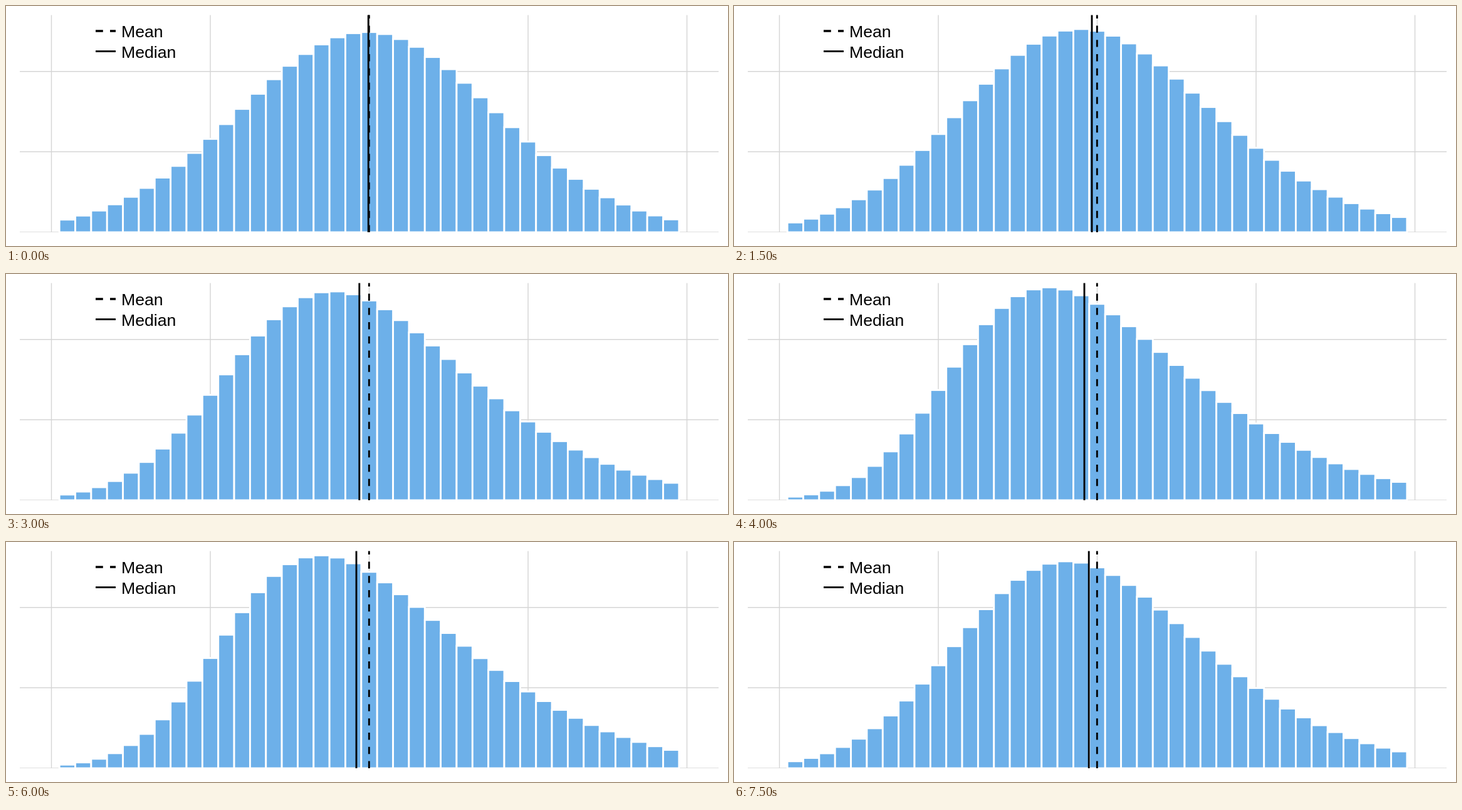
Animation of 1152x384 px, one loop 8 s. Source, as an HTML page:

```html
<!DOCTYPE html>
<html lang="en">
<head>
<meta charset="utf-8">
<title>Mean and median of a skewing histogram</title>
<style>
  html, body { margin: 0; width: 100%; height: 100%; overflow: hidden; background: #fff; }
  svg { display: block; width: 1152px; height: 384px; }
  .grid { stroke: #d5d5d5; stroke-width: 1.42; }
  .bars { fill: #6db0e9; stroke: #fff; stroke-width: 2.85; }
  .mark { stroke: #000; stroke-width: 2.85; }
  text { font: 26.67px "Liberation Sans", Arial, sans-serif; }
</style>
</head>
<body>
<svg viewBox="0 0 1152 384">
  <clipPath id="panel"><rect x="22" y="14.5" width="1115" height="347.5"/></clipPath>
  <g clip-path="url(#panel)">
    <path class="grid" d="M22 104.7H1137M22 233.3H1137M22 362H1137M72.5 14V362M326 14V362M579.5 14V362M833 14V362M1086.5 14V362"/>
    <g class="bars" id="bars"></g>
    <path class="mark" id="median" d="M0 362V14"/>
    <path class="mark" d="M579.3 362V14" stroke-dasharray="11.4"/>
  </g>
  <path class="mark" d="M143 40H175" style="stroke-width:3.6" stroke-dasharray="11.8 11.2"/>
  <path class="mark" d="M143 72.5H175"/>
  <text x="184" y="50">Mean</text>
  <text x="184" y="83">Median</text>
</svg>
<script>
const STEP = 500, STEPS = 16, PEAK_STEP = 10;
const BARS = 39, LEFT = 85.2, PITCH = 25.35, BASE = 362, EDGE = 1.42;
const AREA = 6390, CENTER = 18.95, SPREAD = 8; // in bar indices

const byId = id => document.getElementById(id);
const density = z => Math.exp(-z * z / 2) / Math.sqrt(2 * Math.PI);
const cumulative = z => 1 / (1 + Math.exp(-1.5976 * z - 0.07056 * z ** 3));

// Skew-normal curve whose mean and spread stay fixed as the skew changes
function skewCurve(skew) {
  const shift = skew / Math.hypot(1, skew) * Math.sqrt(2 / Math.PI);
  const scale = SPREAD / Math.sqrt(1 - shift * shift);
  return i => {
    const z = (i - CENTER) / scale + shift;
    return AREA * 2 / scale * density(z) * cumulative(skew * z);
  };
}

const bars = Array.from({ length: BARS }, (_, i) => {
  const bar = document.createElementNS("http://www.w3.org/2000/svg", "rect");
  bar.setAttribute("x", LEFT + PITCH * i);
  bar.setAttribute("width", PITCH);
  return byId("bars").appendChild(bar);
});

function draw(step) {
  const rise = PEAK_STEP - Math.abs(step - PEAK_STEP);
  const curve = skewCurve(0.5 + 0.265 * rise);
  bars.forEach((bar, i) => {
    const height = curve(i) + EDGE;
    bar.setAttribute("y", BASE - height);
    bar.setAttribute("height", height);
  });
  byId("median").setAttribute("transform", `translate(${578.2 - 2.4 * rise})`);
}

const start = performance.now();
function tick() {
  draw(Math.floor((performance.now() - start) / STEP) % STEPS);
  requestAnimationFrame(tick);
}
tick();
</script>
</body>
</html>
```
